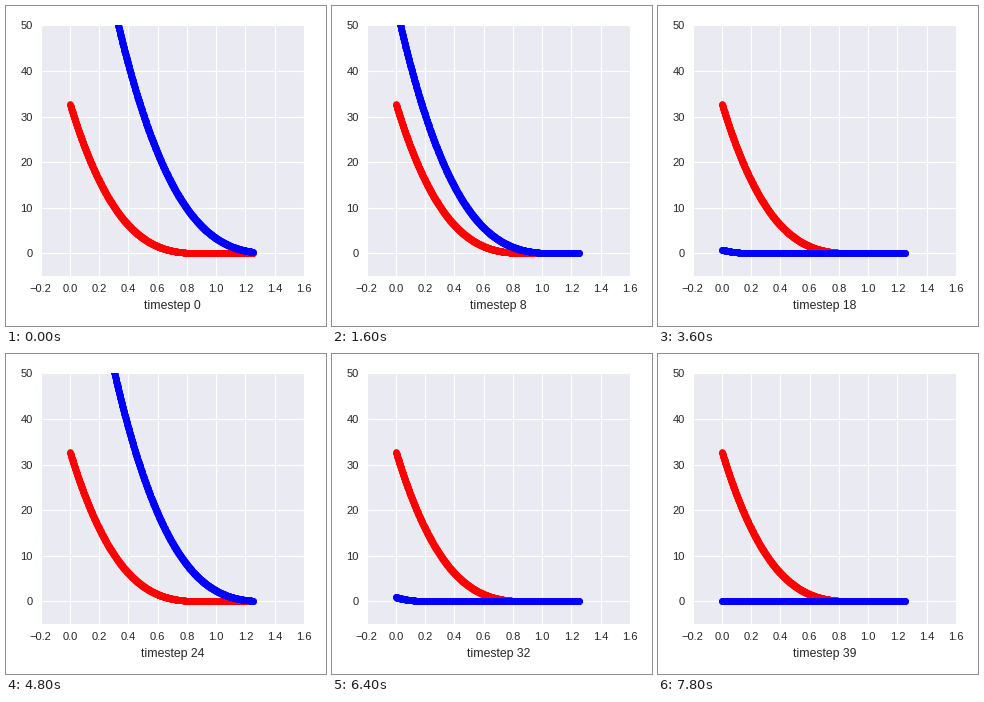
A matplotlib script that plays this animation: 320x320 px, repeating every 8 s.

```python
import numpy as np
import matplotlib.pyplot as plt
from matplotlib.animation import FuncAnimation

SIZE, DPI = 320, 80
STEPS, STEP_MS = 40, 200
LEFT, RIGHT, TOP, BOTTOM = 34.7, 298, 19.45, 269.95
INK = "0.15"

# Key poses: step, and where the blue curve runs out to zero.
KEY_STEPS = [0, 4, 13, 18, 24, 32, 34, 39]
KEY_EDGES = [1.45, 1.437, 0.69, 0.27, 1.387, 0.28, 1.15, 0]


def edge_at(step):
    """Ease in and out between neighbouring key poses."""
    pos = np.interp(step, KEY_STEPS, range(len(KEY_STEPS)))
    i, u = divmod(pos, 1)
    eased = i + (1 - np.cos(np.pi * u)) / 2
    return np.interp(eased, range(len(KEY_EDGES)), KEY_EDGES)


def curve(edge, steepness=40):
    return steepness * np.clip(edge - x, 0, None) ** 3


def blue_curve(step):
    # The cubic starts a little flatter and settles towards the red one.
    return curve(edge_at(step), 40 - 4.4 * np.exp(-step / 12))


plt.rcParams["font.family"] = "Liberation Sans"
fig = plt.figure(figsize=(SIZE / DPI, SIZE / DPI), dpi=DPI, facecolor="white")
ax = fig.add_axes([LEFT / SIZE, 1 - BOTTOM / SIZE,
                   (RIGHT - LEFT) / SIZE, (BOTTOM - TOP) / SIZE],
                  facecolor="#EAEAF2")
ax.set(xlim=(-0.2, 1.6), ylim=(-5, 50),
       xticks=np.arange(-1, 9) * 0.2, yticks=range(0, 51, 10))
ax.xaxis.set_major_formatter("{x:.1f}")
ax.set_axisbelow(True)
ax.grid(color="white", lw=1, ls="-")
ax.tick_params(length=0, pad=7, labelsize=10, labelcolor=INK)
for spine in ax.spines.values():
    spine.set_visible(False)

x = np.linspace(0, 1.25, 1000)
dots = dict(ls="", marker="o", ms=6, mew=0)
ax.plot(x, curve(0.935), color="red", **dots)
moving, = ax.plot(x, blue_curve(0), color="blue", **dots)
label = fig.text((LEFT + RIGHT) / 2 / SIZE, 1 - 303 / SIZE, "", fontsize=11,
                 color=INK, ha="center", va="baseline")


def draw(step):
    moving.set_ydata(blue_curve(step))
    label.set_text(f"timestep {step}")
    return moving, label


anim = FuncAnimation(fig, draw, frames=STEPS, interval=STEP_MS,
                     repeat=True, repeat_delay=0)
plt.show()
```
